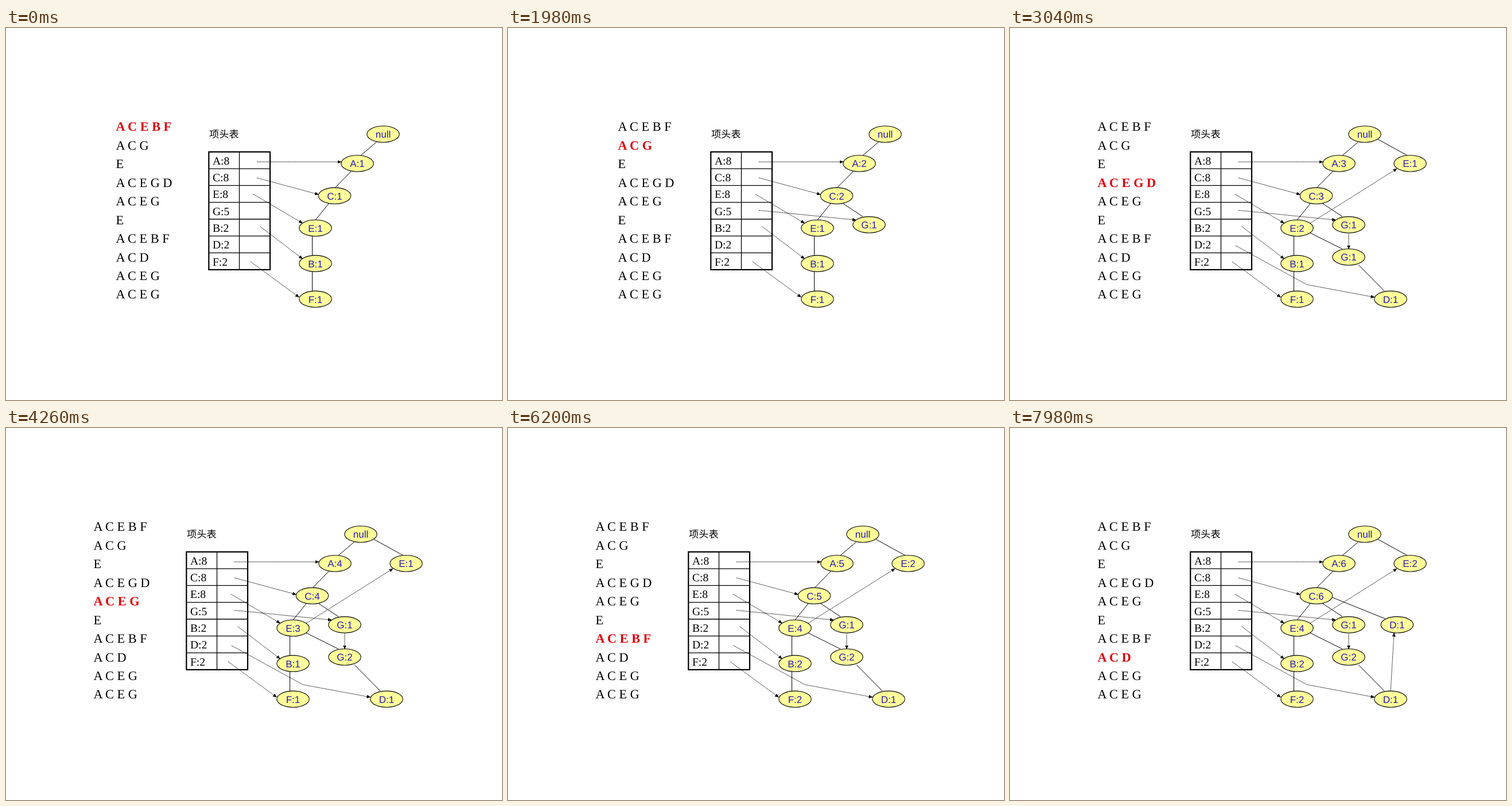
An HTML page that plays this animation: 864x648 px, repeating every 8000 ms.

```html
<!DOCTYPE html>
<html lang="zh">
<head>
<meta charset="utf-8">
<style>
html, body { margin: 0; width: 100%; height: 100%; overflow: hidden; background: #fff; }
svg { display: block; text-rendering: geometricPrecision; }
.serif { font-family: "Liberation Serif", serif; }
.row { font-size: 22.3px; }
.row.active { font-weight: bold; fill: #dc000c; }
.cell { font-size: 19.5px; }
.title { font: 17.2px "Noto Sans CJK SC", "Noto Sans CJK", sans-serif; }
.label { font: 17px "Liberation Sans", sans-serif; fill: #2a18b4; text-anchor: middle; }
.frame { fill: none; stroke: #000; stroke-width: 2.2; }
.grid { fill: none; stroke: #000; stroke-width: 1.3; }
.edge { fill: none; stroke: #000; stroke-width: 1; }
.link { fill: none; stroke: #000; stroke-width: 1; stroke-dasharray: 1.7 1; marker-end: url(#head); }
ellipse { fill: #ffff99; stroke: #000; stroke-width: 1.1; }
</style>
</head>
<body>
<svg width="864" height="648" viewBox="0 0 864 648">
  <defs>
    <marker id="head" markerUnits="userSpaceOnUse" markerWidth="7" markerHeight="6" refX="6.5" refY="3" orient="auto">
      <path d="M0 0L7 3L0 6Z"/>
    </marker>
  </defs>
  <g id="scene"></g>
</svg>
<script>
const LOOP = 8000, FIRST = 990, STEP = 1020;
const NARROW_TREE_SHIFT = 39;

const transactions = ["ACEBF", "ACG", "E", "ACEGD", "ACEG", "E", "ACEBF", "ACD", "ACEG", "ACEG"];
const headers = ["A:8", "C:8", "E:8", "G:5", "B:2", "D:2", "F:2"];

// Each node: its prefix, centre, line from its parent, and dotted link leading to it.
const nodes = [
  ["", 618, 185, "", ""],
  ["A", 573, 236, "M606 199L579 222", "M398 233.2H545"],
  ["AC", 533.5, 292.3, "M562 250L534 278.5", "M398 261L505.5 290"],
  ["ACE", 500, 348.5, "M523 306L500 334.5", "M392 289.5L477.5 340"],
  ["ACEB", 500, 410.3, "M494.5 363V396", "M404 346L477.5 402"],
  ["ACEBF", 500, 472.3, "M494.5 424V458", "M387 407L471.5 469"],
  ["ACG", 590, 342.8, "M545 306L579 328.5", "M398 317.5L567.5 334.5"],
  ["E", 697, 236, "M641 194L692 222", "M523 340L674 245"],
  ["ACEG", 590, 399, "M523 357L579 385", "M590 357V385"],
  ["ACEGD", 663, 472.3, "M607 412.5L652 458", "M393 379L517 447L635 469"],
  ["ACD", 674.3, 342.8, "M561 295L658 334", "M663 458L669 357"]
];

const scene = document.getElementById("scene");
const text = (cls, x, y, s) => `<text class="${cls}" x="${x}" y="${y}">${s}</text>`;
const path = (cls, d) => d && `<path class="${cls}" d="${d}"/>`;

function drawTable() {
  let grid = "M367.5 215.5V421";
  for (let i = 1; i < 7; i++) grid += `M314.3 ${215.8 + i * 29.3}H421`;
  return text("title", 315, 191, "项头表")
    + path("grid", grid)
    + `<rect class="frame" x="314.3" y="215.8" width="106.7" height="205.2"/>`
    + headers.map((h, i) => text("serif cell", 321, 237.8 + i * 29.3, h)).join("");
}

function drawNode([prefix, x, y], inserted) {
  const count = inserted.filter(t => t.startsWith(prefix)).length;
  const label = prefix ? `${prefix.at(-1)}:${count}` : "null";
  return `<ellipse cx="${x}" cy="${y}" rx="28.2" ry="14.2"/>` + text("label", x, y + 6.2, label);
}

function draw(step) {
  const inserted = transactions.slice(0, step);
  const visible = nodes.filter(([prefix]) => inserted.some(t => t.startsWith(prefix)));
  const rows = transactions.map((t, i) =>
    text("serif row" + (i === step - 1 ? " active" : ""), 152.6, 179.4 + i * 32.45, [...t].join(" ")));
  scene.setAttribute("transform", `translate(${step < 3 ? NARROW_TREE_SHIFT : 0} 0)`);
  scene.innerHTML = rows.join("") + drawTable()
    + visible.map(n => path("edge", n[3])).join("")
    + visible.map(n => drawNode(n, inserted)).join("")
    + visible.map(n => path("link", n[4])).join("");
}

let shown = 0;
function tick() {
  const t = performance.now() % LOOP;
  const step = t < FIRST ? 1 : 2 + Math.floor((t - FIRST) / STEP);
  if (step !== shown) draw(shown = step);
  requestAnimationFrame(tick);
}
tick();
</script>
</body>
</html>
```
